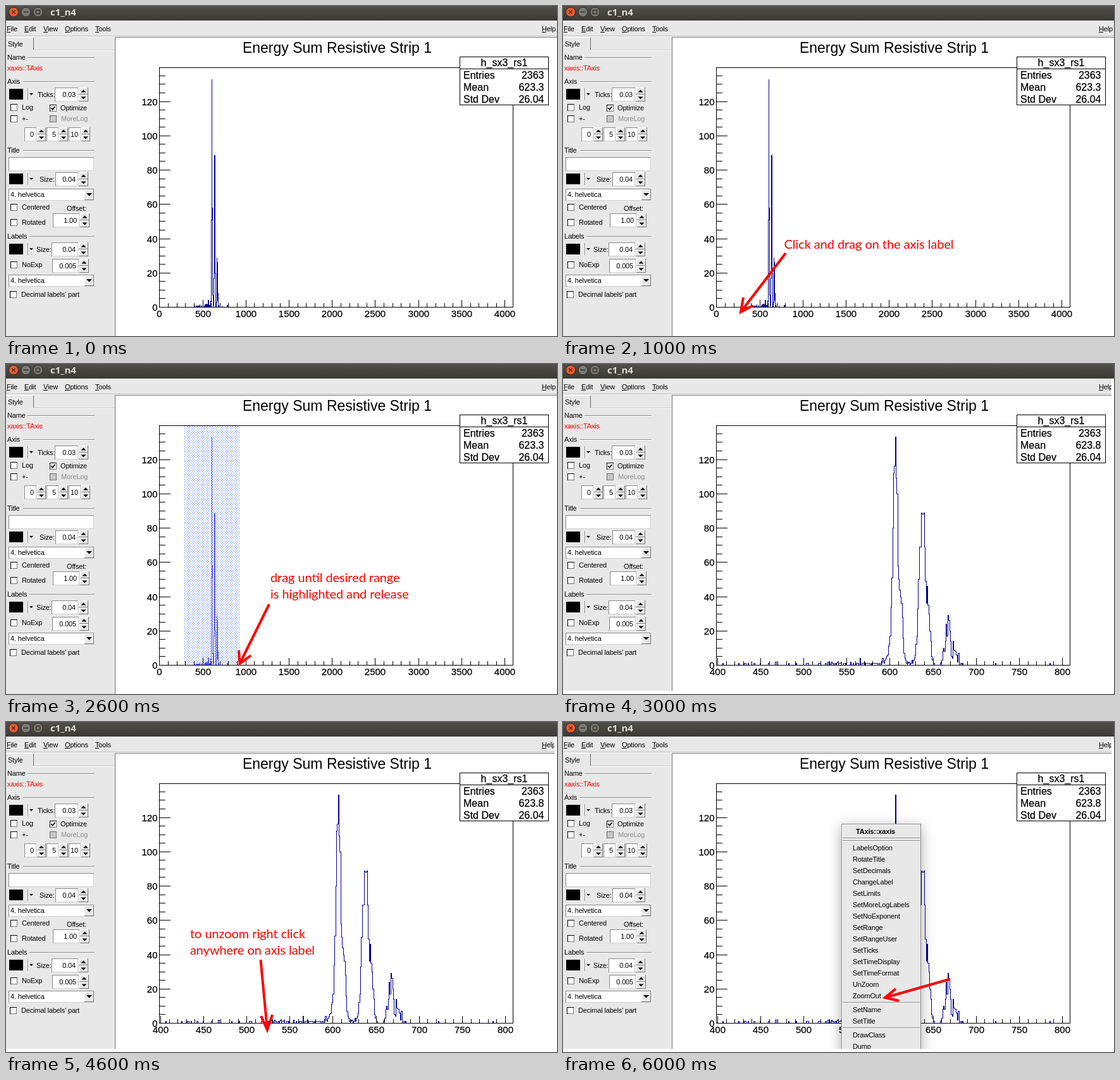
Recreate the animation shown at these times as an HTML page. Size 871 px wide and 522 px high, loop 7000 ms.

```html
<!DOCTYPE html>
<html lang="en">
<head>
<meta charset="utf-8">
<title>Zooming an axis</title>
<style>
  html, body { margin: 0; width: 100%; height: 100%; overflow: hidden; background: #fff; }
  svg { display: block; width: 871px; height: 522px; }
  text { white-space: pre; }
  .ui { font: 11px "Liberation Sans", Arial, sans-serif; letter-spacing: -.17px; }
  .plot { font: 15px "Liberation Sans", Arial, sans-serif; }
  .stat { font: 16px "Liberation Sans", Arial, sans-serif; }
  .plot, .stat { stroke: #000; stroke-width: .25px; }
  .head { font: 23px "Liberation Sans", Arial, sans-serif; }
  .note { font: 19.85px Lato, Carlito, sans-serif; }
  .bar { font: 600 15px "Noto Sans", "Open Sans", sans-serif; }
</style>
</head>
<body>
<svg id="stage" viewBox="0 0 871 522" xmlns="http://www.w3.org/2000/svg">
  <defs>
    <linearGradient id="dark" x2="0" y2="1">
      <stop offset="0" stop-color="#504f49"/><stop offset="1" stop-color="#3b3a36"/>
    </linearGradient>
    <pattern id="dots" width="4" height="4" patternUnits="userSpaceOnUse">
      <path d="M0 0h1v1h-1zM2 2h1v1h-1z" fill="#3c6cf0" shape-rendering="crispEdges"/>
    </pattern>
    <clipPath id="cut"><rect y="23" width="867" height="494"/></clipPath>
  </defs>
</svg>
<script>
const STEP = 1000, STEPS = 7;
const stage = document.getElementById('stage');
const BG = '#e8e8e8', BLUE = '#000099', RED = '#ff0000';
const layers = [];

function add(parent, tag, attrs, content) {
  const el = document.createElementNS(stage.namespaceURI, tag);
  for (const k in attrs) el.setAttribute(k, attrs[k]);
  if (content !== undefined) el.textContent = content;
  return parent.appendChild(el);
}
const rect = (g, x, y, width, height, fill) =>
  add(g, 'rect', { x, y, width, height, fill, 'shape-rendering': 'crispEdges' });
const line = (g, d, stroke = '#000') =>
  add(g, 'path', { d, stroke, fill: 'none', 'shape-rendering': 'crispEdges' });
const text = (g, cls, x, y, s, fill = '#000', anchor = 'start') =>
  add(g, 'text', { class: cls, x, y, fill, 'text-anchor': anchor }, s);

// A group visible from step `from` up to and including step `to`
function layer(from, to, attrs = {}) {
  const el = add(stage, 'g', attrs);
  layers.push({ el, from, to });
  return el;
}

/* ---- window and side panel ---- */
function sunken(g, x, y, w, h, fill = '#fff') {
  rect(g, x, y, w, h, fill);
  line(g, `M${x + .5} ${y + h}V${y + .5}H${x + w}`, '#8a8a8a');
  line(g, `M${x + 1} ${y + h - .5}H${x + w - .5}V${y + 1}`, '#d0d0d0');
}
function raised(g, x, y, w, h) {
  rect(g, x, y, w, h, BG);
  line(g, `M${x + .5} ${y + h}V${y + .5}H${x + w}`, '#fff');
  line(g, `M${x} ${y + h - .5}H${x + w - .5}V${y}`, '#777');
}
const tri = (g, x, y, r, dir = 1) =>
  add(g, 'path', { d: `M${x - r} ${y}h${2 * r}l${-r} ${r * dir}z`, fill: '#000' });

function spin(g, x, y, w, s, sw = 15) {
  sunken(g, x, y, w, 22);
  text(g, 'ui', x + w - 4, y + 15, s, '#000', 'end');
  raised(g, x + w + 1, y, sw, 11);
  raised(g, x + w + 1, y + 11, sw, 11);
  const mid = x + w + 1 + sw / 2;
  tri(g, mid, y + 7.5, 4, -1);
  tri(g, mid, y + 14.5, 4);
}
function check(g, x, y, label, tx, on, off) {
  rect(g, x + 1, y + 1, 11, 11, off ? '#c8c8c8' : '#fff');
  line(g, `M${x + 1} ${y + 11.5}H${x + 11.5}V${y + 1}`, '#777');
  line(g, `M${x + 1.5} ${y + 12}V${y + 1.5}H${x + 12}`, off ? '#666' : '#000');
  if (on) add(g, 'path', { d: `M${x + 3.5} ${y + 6}l2 3l4 -5`, stroke: '#000', 'stroke-width': 1.8, fill: 'none' });
  text(g, 'ui', tx, y + 10, label, off ? '#8c8c8c' : '#000');
}
function swatch(g, y) {
  rect(g, 5, y, 22, 17, '#000');
  line(g, `M34.5 ${y - 1}v19`, '#888');
  line(g, `M35.5 ${y - 1}v19`, '#fff');
  tri(g, 40, y + 7, 3);
}
function group(g, y, label, x) {
  text(g, 'ui', 2, y + 4, label);
  line(g, `M${x} ${y + .5}H140`, '#888');
  line(g, `M${x} ${y + 1.5}H140`, '#fff');
}
function combo(g, y) {
  sunken(g, 4, y, 135, 19);
  text(g, 'ui', 7, y + 13, '4. helvetica');
  raised(g, 124, y + 1, 15, 17);
  tri(g, 131.5, y + 7, 4.5);
}

function drawWindow(g) {
  rect(g, 0, 0, 871, 522, BG);
  rect(g, 0, 0, 871, 23, 'url(#dark)');
  for (const [x, fill] of [[12, '#ee5a2b'], [31.5, '#7b7a74'], [50.5, '#7b7a74']])
    add(g, 'circle', { cx: x, cy: 9.5, r: 7.5, fill, stroke: '#2f2e2a' });
  add(g, 'path', {
    d: 'M9.5 7l5 5m0 -5l-5 5M28 9.5h7M47.5 6.5h6v6h-6z',
    stroke: '#3a2f28', 'stroke-width': 1.4, fill: 'none'
  });
  text(g, 'bar', 70, 15, 'c1_n4', '#dfdbd2');

  for (const [x, s, u] of [[1, 'File', 6], [29, 'Edit', 7], [59, 'View', 7],
                           [93, 'Options', 8], [141, 'Tools', 6], [847, 'Help', 7]]) {
    text(g, 'ui', x, 40, s);
    line(g, `M${x} 41.5h${u}`);
  }
  line(g, 'M0 47.5H871', '#bbb');
  line(g, 'M0 48.5H871', '#fff');

  rect(g, 173, 50, 698, 472, '#fff');
  line(g, 'M172.5 522V49.5H871', '#777');
  line(g, 'M0 49.5H43', '#fff');
  line(g, 'M43.5 50V70', '#666');
  line(g, 'M43 70.5H171', '#fff');
  line(g, 'M43 69.5H171', '#ccc');
  text(g, 'ui', 3, 64, 'Style');

  group(g, 81, 'Name', 34);
  text(g, 'ui', 2, 102, 'xaxis::TAxis', RED);

  group(g, 119, 'Axis', 27);
  swatch(g, 131);
  text(g, 'ui', 50, 144, 'Ticks:');
  spin(g, 77, 129, 37, '0.03');
  check(g, 6, 154, 'Log', 25);
  check(g, 68, 155, 'Optimize', 86, true);
  check(g, 6, 172, '+-', 25);
  check(g, 68, 172, 'MoreLog', 87, false, true);
  [['0', 29], ['5', 64], ['10', 99]].forEach(([s, x]) => spin(g, x, 192, 19, s, 14));

  group(g, 228, 'Title', 27);
  sunken(g, 4, 239, 135, 22);
  swatch(g, 265);
  text(g, 'ui', 53, 278, 'Size:');
  spin(g, 78, 263, 36, '0.04');
  combo(g, 289);
  check(g, 6, 312, 'Centered', 25);
  text(g, 'ui', 96, 324, 'Offset:');
  check(g, 6, 336, 'Rotated', 25);
  spin(g, 74, 328, 42, '1.00');

  group(g, 364, 'Labels', 37);
  swatch(g, 376);
  text(g, 'ui', 48, 389, 'Size:');
  spin(g, 72, 374, 42, '0.04');
  check(g, 6, 403, 'NoExp', 25);
  spin(g, 73, 400, 42, '0.005');
  combo(g, 425);
  check(g, 5, 450, "Decimal labels' part", 24);
}

/* ---- histogram ---- */
const peaks = [1, 4, 2, 1, 3, 4, 5, 6, 11, 12, 17, 34, 51, 80, 112, 116, 133, 109, 100, 58,
  50, 44, 40, 36, 28, 16, 7, 4, 3, 1, 2, 1, 2, 0, 1, 3, 1, 3, 4, 6, 12, 17, 33, 50, 69, 69,
  89, 88, 88, 89, 69, 49, 36, 46, 35, 30, 20, 14, 5, 3, 1];
const tail = [1, 2, 3, 8, 10, 8, 14, 24, 17, 29, 26, 20, 14, 5, 4, 14, 9, 8, 8, 6, 2, 7];
const strays = { 565: 4, 722: 1, 785: 1 };

function rand(n) {
  const s = Math.sin(n * 12.9898) * 43758.5453;
  return s - Math.floor(s);
}
function count(v) {
  if (v >= 590 && v <= 650) return peaks[v - 590];
  if (v >= 658 && v < 680) return tail[v - 658];
  if (strays[v]) return strays[v];
  if (v < 400 || v > 692) return 0;
  const p = v > 650 ? .25 : .1 + .65 * ((v - 400) / 190) ** 2;
  const r = rand(v);
  return r < p * .15 ? 2 : r < p ? 1 : 0;
}
const py = c => Math.round(476 - c * 2.712) + .5;

function histPath(lo, hi, px) {
  let d = `M242.5 ${py(0)}`, last = 0;
  for (let v = Math.ceil(lo); v <= hi; v++) {
    const c = v < hi ? count(v) : 0;
    if (c !== last) d += `H${px(v)}V${py(c)}`;
    last = c;
  }
  return d + 'H801.5';
}

function drawPlot(g, lo, hi, major, mean, ink = BLUE) {
  const px = v => Math.round(242.3 + (v - lo) * 559 / (hi - lo)) + .5;
  text(g, 'head', 523.5, 74, 'Energy Sum Resistive Strip 1', '#000', 'middle');
  line(g, histPath(lo, hi, px), ink);
  line(g, 'M242.5 97.5H801.5V476.5H242.5Z');
  let ticks = '';
  for (let c = 0; c < 140; c += 5) {
    ticks += `M242 ${py(c)}h${c % 20 ? 10 : 18}`;
    if (c % 20 === 0) text(g, 'plot', 239.5, py(c) + 5, c, '#000', 'end');
  }
  const minor = major / 5;
  for (let v = Math.ceil(lo / minor) * minor; v <= hi; v += minor) {
    ticks += `M${px(v)} 477v${v % major ? -7 : -12}`;
    if (v % major === 0) text(g, 'plot', px(v), 492, v, '#000', 'middle');
  }
  line(g, ticks);

  rect(g, 717, 80, 141, 77, '#000');
  rect(g, 718, 81, 139, 75, '#fff');
  line(g, 'M717 99.5H857');
  text(g, 'stat', 787.5, 95, 'h_sx3_rs1', '#000', 'middle');
  [['Entries', '2363'], ['Mean', mean], ['Std Dev', '26.04']].forEach(([k, v], i) => {
    text(g, 'stat', 723, 115 + 19 * i, k);
    text(g, 'stat', 850.5, 115 + 19 * i, v, '#000', 'end');
  });
}

/* ---- notes and context menu ---- */
function note(g, x, y, ...rows) {
  rows.forEach((s, i) => text(g, 'note', x, y + 26 * i, s, RED));
}
const arrow = (g, from, tip, a, b) => add(g, 'path', {
  d: `M${from}L${tip}M${a}L${tip}L${b}`, stroke: RED, 'stroke-width': 4, fill: 'none'
});

function drawMenu(g) {
  rect(g, 440, 161, 126, 380, BG).style.filter = 'drop-shadow(0 5px 11px rgba(0,0,0,.32))';
  line(g, 'M440.5 522V161.5H565.5V522', '#8a8a8a');
  line(g, 'M441.5 522V162.5H564', '#fff');
  const rule = y => {
    line(g, `M442 ${y + .5}H564`, '#888');
    line(g, `M442 ${y + 1.5}H564`, '#fff');
  };
  add(g, 'text', { class: 'ui', x: 494, y: 177, 'text-anchor': 'middle', style: 'font-weight:bold' }, 'TAxis::xaxis');
  [183, 187, 443, 483].forEach(rule);
  const list = (y, items) => items.split(' ').forEach((s, i) => text(g, 'ui', 458, y + 18 * i, s));
  list(203, 'LabelsOption RotateTitle SetDecimals ChangeLabel SetLimits SetMoreLogLabels SetNoExponent ' +
    'SetRange SetRangeUser SetTicks SetTimeDisplay SetTimeFormat UnZoom ZoomOut');
  list(459, 'SetName SetTitle');
  list(499, 'DrawClass Dump');
}

/* ---- scene ---- */
drawWindow(add(stage, 'g', {}));
drawPlot(layer(0, 1), 0, 4096, 500, '623.3');

const click = layer(1, 1);
note(click, 349.5, 384, 'Click and drag on the axis label');
arrow(click, '352 391', '281 484', '285 461', '300 474');

const drag = layer(2, 2);
rect(drag, 282, 97, 88, 379, 'url(#dots)');
drawPlot(drag, 0, 4096, 500, '623.3', '#5656e2');
note(drag, 418, 344.5, 'drag until desired range', 'is highlighted and release');
arrow(drag, '416 380', '369.5 474', '368 453', '387 461');

const edge = layer(3, 6);
rect(edge, 867, 23, 4, 499, '#fff');
rect(edge, 0, 517, 871, 5, '#fff');
drawPlot(edge, 398.8, 809, 50, '623.8');

const unzoom = layer(4, 4);
note(unzoom, 291, 341.5, 'to unzoom right click', 'anywhere on axis label');
arrow(unzoom, '402.5 376', '413 487', '403 465', '421 463');

drawMenu(layer(5, 6, { 'clip-path': 'url(#cut)' }));
arrow(layer(6, 6), '610.5 407', '509 436', '526 422', '531 441');

let shown = -1;
function tick() {
  const step = Math.floor(performance.now() / STEP) % STEPS;
  if (step !== shown) {
    shown = step;
    for (const { el, from, to } of layers)
      el.style.display = step >= from && step <= to ? '' : 'none';
  }
  requestAnimationFrame(tick);
}
tick();
</script>
</body>
</html>
```
